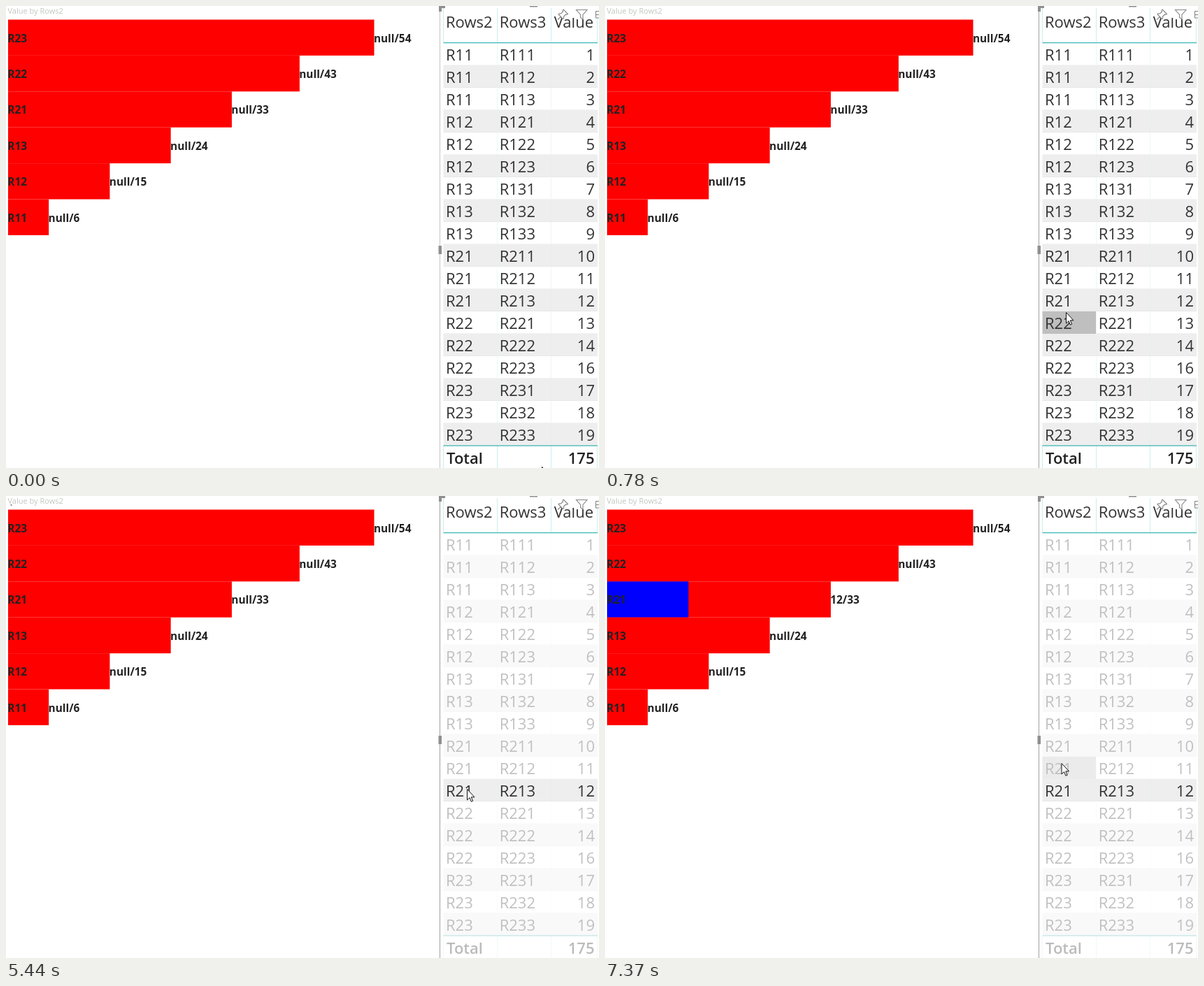
An HTML page that plays this animation: 848 by 661 pixels, repeating every 8 s.

```html
<!DOCTYPE html>
<html lang="en">
<head>
<meta charset="utf-8">
<title>Cross-filtered bars</title>
<style>
html, body { margin: 0; width: 100%; height: 100%; overflow: hidden; background: #fff; }
svg { display: block; width: 100%; height: 100%; font-family: "Open Sans", "Noto Sans", sans-serif; }
.cell { font-size: 22px; fill: #333; }
.total { font-weight: 600; fill: #222; }
.label { font-size: 15.4px; font-weight: 700; fill: #222; }
.icon { fill: none; stroke: #858585; stroke-width: 1.1; }
.end { text-anchor: end; }
</style>
</head>
<body>
<svg id="stage" viewBox="0 0 848 661"></svg>
<script>
const LOOP = 8000;
const SELECT = 5440, FILTER = 6690;
const ROW_TOP = 53, ROW_H = 32, PICKED = 11;
const stage = document.getElementById('stage');

function add(parent, tag, attrs, text) {
  const el = document.createElementNS(stage.namespaceURI, tag);
  for (const k in attrs) el.setAttribute(k, attrs[k]);
  if (text !== undefined) el.textContent = text;
  parent.appendChild(el);
  return el;
}
const rect = (p, x, y, width, height, fill) => add(p, 'rect', { x, y, width, height, fill });
const text = (p, x, y, cls, str) => add(p, 'text', { x, y, class: cls }, str);
const show = (el, on) => el.setAttribute('visibility', on ? 'visible' : 'hidden');

// Bar chart
const UNIT = 9.694, BAR_H = 51.4;
const bars = [['R23', 54], ['R22', 43], ['R21', 33], ['R13', 24], ['R12', 15], ['R11', 6]];
add(stage, 'text', { x: 2.5, y: 11, 'font-size': 11, fill: '#c1c6c1' }, 'Value by Rows2');
let part, partLabel;
bars.forEach(([name, value], i) => {
  const y = 19.5 + i * BAR_H, w = value * UNIT;
  rect(stage, 3, y, w, BAR_H, '#f00');
  if (name === 'R21') part = rect(stage, 3, y, 12 * UNIT, BAR_H, '#00f');
  text(stage, 2.3, y + 32, 'label', name);
  const label = text(stage, 2.4 + w, y + 32, 'label', 'null/' + value);
  if (name === 'R21') partLabel = label;
});

// Loading dots
const dots = Array.from({ length: 5 }, () => add(stage, 'circle', { r: 0.9, fill: '#444' }));

// Table
const rows = Array.from({ length: 18 }, (_, i) => {
  const y = ROW_TOP + i * ROW_H;
  const g = add(stage, 'g', {});
  const odd = i % 2;
  if (odd) rect(g, 625.5, y, 220.5, ROW_H, '#eee');
  rect(g, 625.5, y + ROW_H - 1, 220.5, 1, odd ? '#e8e8e8' : '#f3f3f3');
  for (const x of [702, 779]) rect(g, x, y, 1, ROW_H, odd ? '#e9eeee' : '#ecf7f7');
  const hover = rect(g, 625.5, y, 76.5, ROW_H, odd ? '#b4b4b4' : '#bfbfbf');
  const name = 'R' + (1 + Math.floor(i / 9)) + (1 + Math.floor(i % 9 / 3));
  text(g, 629, y + 25, 'cell', name);
  text(g, 705.7, y + 25, 'cell', name + (1 + i % 3));
  text(g, 842, y + 25, 'cell end', i + 1 + (i >= 14));
  return { g, hover };
});

const foot = add(stage, 'g', {});
for (const x of [625, 702, 779, 845]) rect(foot, x, 629, 1, 32, '#cdeeee');
rect(foot, 625.5, 628.5, 220.5, 1.2, '#35b5b3');
text(foot, 630, 655, 'cell total', 'Total');
text(foot, 841.5, 655, 'cell total end', '175');

for (const x of [625, 702, 779, 845]) rect(stage, x, 3, 1, 49, '#cdeeee');
rect(stage, 625.5, 52, 220.5, 1.2, '#35b5b3');
text(stage, 629, 30.5, 'cell', 'Rows2');
text(stage, 705.7, 30.5, 'cell', 'Rows3');
text(stage, 840, 30.5, 'cell end', 'Value');

// Visual header icons
rect(stage, 788, 0, 60, 17, '#fff');
add(stage, 'path', { class: 'icon', d: 'M797 5l6.5 6.5-1.5 1-1.5-.5-3 3 .2 2.5-1.2 1-6.500-6.500 1-1.200 2.500.2 3-3-.5-1.500zM793.300 15.300L789 19.500' });
add(stage, 'path', { class: 'icon', d: 'M815.5 5.500h15.500l-6 7v6.500l-3.500-2.500v-4z' });
add(stage, 'path', { class: 'icon', d: 'M848 7.500h-4.500v9.500h4.500M843.500 12.500h4.500' });

// Selection frame
const edge = rect(stage, 620, 8, 1, 653, '#999');
add(stage, 'path', { fill: '#8f8f8f', d: 'M619 0h9v3h-5v5h-4zM749 0h11v1.500h-11zM618.500 343h4.500v12h-4.500z' });

// Tooltip, click mark and pointer
const tip = add(stage, 'g', {});
add(tip, 'rect', { x: 668.5, y: 434.5, width: 35, height: 22, fill: '#fff', stroke: '#444' });
add(tip, 'text', { x: 675, y: 450, 'font-size': 11.5, fill: '#333' }, 'R21');
const click = add(stage, 'circle', { r: 11.5, fill: '#ff0', 'fill-opacity': 0.5 });
const pointer = add(stage, 'path', {
  d: 'M.5 .5V16L4 12.600 6.400 18.300 8.600 17.300 6.300 11.800H11Z', fill: '#fff', stroke: '#111', 'stroke-width': 1
});

// Pointer path: time, x, y
const path = [
  [0, 766, 659], [70, 712, 636], [150, 690, 580], [230, 672, 530], [310, 663, 498],
  [390, 660, 478], [540, 659, 464], [700, 659, 450], [850, 659, 428], [1010, 659, 419],
  [5520, 659, 419], [6210, 658, 412], [6290, 657, 405], [6440, 654.5, 387], [6740, 652.5, 382]
];

function pointerAt(t) {
  if (t < 70) return [766, 659];
  const k = path.findIndex(p => p[0] > t);
  if (k < 0) return path[path.length - 1].slice(1);
  const [t0, x0, y0] = path[k - 1], [t1, x1, y1] = path[k];
  const f = (t - t0) / (t1 - t0);
  return [x0 + (x1 - x0) * f, y0 + (y1 - y0) * f];
}

function draw(t) {
  const [x, y] = pointerAt(t).map(v => Math.round(v * 2) / 2);
  const selected = t >= SELECT, filtered = t >= FILTER;
  pointer.setAttribute('transform', `translate(${x} ${y})`);
  edge.setAttribute('fill', t < 70 ? '#c4c4c4' : '#a0a0a0');

  const over = x < 702 && (!selected || filtered) ? Math.floor((y - ROW_TOP) / ROW_H) : -1;
  rows.forEach(({ g, hover }, i) => {
    g.setAttribute('opacity', selected && i !== PICKED ? 0.3 : 1);
    show(hover, i === over);
  });
  foot.setAttribute('opacity', selected ? 0.3 : 1);

  show(part, filtered);
  partLabel.textContent = filtered ? '12/33' : 'null/33';

  dots.forEach((dot, i) => {
    const s = (t - SELECT) / 1000 - i * 0.1;
    const a = (90 + 200 * s) * Math.PI / 180;
    dot.setAttribute('cx', 7.5 + 5 * Math.cos(a));
    dot.setAttribute('cy', 7.8 + 5 * Math.sin(a));
    show(dot, s >= 0 && !filtered);
  });

  show(tip, t >= 1390 && t < 2170);
  show(click, (t >= 2170 && t < 2400) || (t >= 7220 && t < 7370));
  click.setAttribute('cx', x);
  click.setAttribute('cy', y + 0.5);
}

function tick() {
  draw(performance.now() % LOOP);
  requestAnimationFrame(tick);
}
tick();
</script>
</body>
</html>
```
